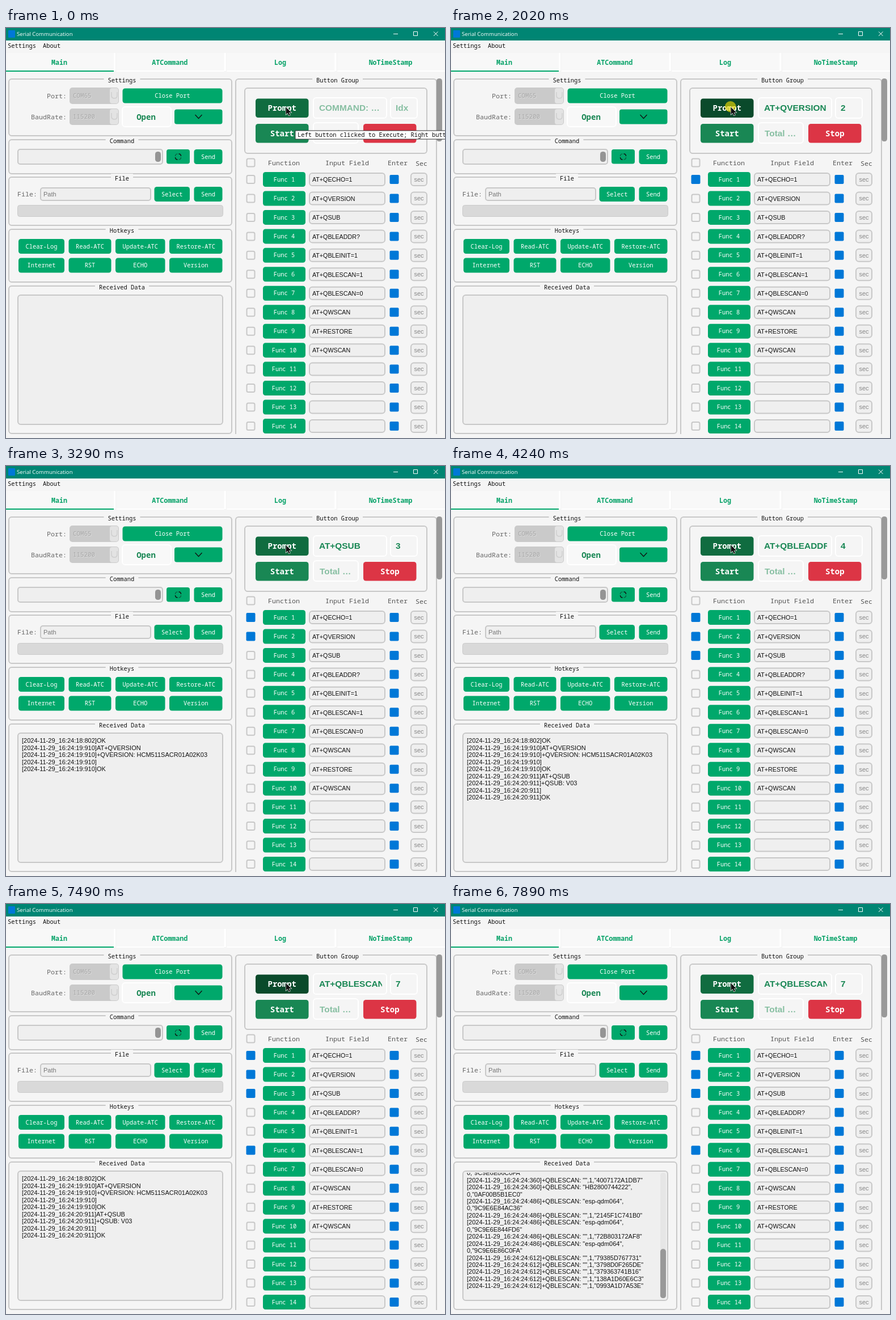
An HTML page for the animation above (8 s loop, 774 by 723 pixels).

```html
<!DOCTYPE html>
<html lang="en">
<head>
<meta charset="utf-8">
<title>Serial Communication</title>
<style>
html, body { margin: 0; width: 100%; height: 100%; overflow: hidden; background: #f5f5f5; }
svg { display: block; }
text { white-space: pre; }
.mono { font-family: "Noto Sans Mono", "DejaVu Sans Mono", monospace; }
.sans { font-family: "Liberation Sans", Arial, sans-serif; }
.ui { font-family: "Open Sans", "Noto Sans", sans-serif; }
.bold { font-weight: bold; }
</style>
</head>
<body>
<svg id="stage" width="774" height="723" viewBox="0 0 774 723" xmlns="http://www.w3.org/2000/svg">
  <defs>
    <clipPath id="logClip"><rect x="22" y="474" width="359" height="221"/></clipPath>
    <clipPath id="cmdClip"><rect x="550" y="126" width="113" height="30"/></clipPath>
    <clipPath id="listClip"><rect x="400" y="80" width="374" height="636"/></clipPath>
  </defs>
  <g id="base"></g>
  <g id="live"></g>
</svg>
<script>
const GREEN = '#00a86b', DARK = '#198754', BLUE = '#0078d7', EDGE = '#c8c8c8', BG = '#f5f5f5', FIELD = '#efefef';
const DURATION = 8000;

// Boxes are given by their outer edges; text by its vertical centre.
function box(x1, y1, x2, y2, fill, edge, r = 4, w = 2) {
  const i = edge ? w / 2 : 0;
  return `<rect x="${x1 + i}" y="${y1 + i}" width="${x2 - x1 - 2 * i}" height="${y2 - y1 - 2 * i}" rx="${r}" fill="${fill}"` +
    (edge ? ` stroke="${edge}" stroke-width="${w}"` : '') + '/>';
}
function text(s, x, y, size, fill, cls = 'mono', anchor = 'start') {
  return `<text x="${x}" y="${y + size * 0.35}" font-size="${size}" fill="${fill}" class="${cls}" text-anchor="${anchor}">${s}</text>`;
}
const mid = (s, x, y, size, fill, cls) => text(s, x, y, size, fill, cls, 'middle');
const path = (d, stroke, w = 1) => `<path d="${d}" fill="none" stroke="${stroke}" stroke-width="${w}"/>`;

function button(s, x1, y1, x2, y2, fill = GREEN, size = 10.4, cls = 'mono') {
  return box(x1, y1, x2, y2, fill, null, 4.5) + mid(s, (x1 + x2) / 2, (y1 + y2) / 2, size, '#fff', cls);
}
function group(title, x1, y1, x2, y2, cx) {
  const half = title.length * 3.12 + 7;
  return box(x1, y1, x2, y2, 'none', EDGE, 5) +
    box(cx - half, y1 - 5, cx + half, y1 + 7, BG, null, 0) +
    mid(title, cx, y1 + 3.2, 10.4, '#111');
}
function combo(s, y) {
  return box(112, y, 199, y + 29, '#cacaca', null, 5) +
    box(183, y + 1, 198, y + 28, '#e3e3e3', null, 4) +
    path(`M186 ${y + 8}v6q0 5 5 5t5-5v-6`, '#cfcfcf', 1.5) +
    text(s, 119, y + 15.5, 10.8, '#dedede') + text(s, 118, y + 14.5, 10.8, '#a8a8a8');
}
const tick = (x, y) => box(x - 8, y - 8, x + 8, y + 8, BLUE, null, 2);
const check = (y, on) => on ? tick(431.5, y) : box(423.5, y - 8, 439.5, y + 8, BG, EDGE, 2.5);

const commands = ['AT+QECHO=1', 'AT+QVERSION', 'AT+QSUB', 'AT+QBLEADDR?', 'AT+QBLEINIT=1', 'AT+QBLESCAN=1',
  'AT+QBLESCAN=0', 'AT+QWSCAN', 'AT+RESTORE', 'AT+QWSCAN', '', '', '', ''];
const rowY = i => 267 + i * 33.46;

function drawTop() {
  let s = box(0, 0, 774, 22, '#008573', null, 0) + box(4, 4, 16, 17, BLUE, null, 1) +
    text('Serial Communication', 19, 11, 9.6, '#fff', 'ui') +
    path('M683 10.5h8M718.5 6.5h7v7h-7zM754 6.5l7.500 7.500M761.500 6.500l-7.500 7.500', '#fff') +
    text('Settings', 3, 31, 10.4, '#111') + text('About', 65, 31, 10.4, '#111');
  ['Main', 'ATCommand', 'Log', 'NoTimeStamp'].forEach((name, i) => {
    const x = i * 194.7;
    s += box(x, 44, x + 190.5, 76, '#f8f8f8', null, 0) + box(x + 190, 44, x + 193, 76, '#fff', null, 0) +
      box(x, 75, x + 190, 77, i ? '#fff' : GREEN, null, 0) + mid(name, 94 + x, 61, 11.67, '#07a268', 'mono bold');
  });
  return s;
}

function drawLeft() {
  let s = group('Settings', 4, 89, 399, 191, 204.5) + group('Command', 4, 196, 399, 258, 204.5) +
    group('File', 4, 262, 399, 349, 204.5) + group('Hotkeys', 4, 354, 399, 449, 204.5) +
    group('Received Data', 4, 454, 399, 716, 204.5);
  s += text('Port:', 72, 120, 11.67, '#666') + text('BaudRate:', 44, 157, 11.67, '#666') +
    combo('COM65', 105) + combo('115200', 142) + button('Close Port', 205.5, 106.5, 381.5, 132.5) +
    box(204, 138, 292, 175, '#f8f8f8', '#fff', 5) + mid('Open', 247, 157, 14, DARK, 'mono bold') +
    box(297, 143.5, 381.5, 169.5, GREEN) + path('M333.5 153l6 6.5l6-6.5', '#111', 1.3);
  s += box(20, 213, 277, 241, FIELD, EDGE) + box(263, 218, 273, 236, '#949494', null, 4.5) +
    box(283, 214, 324, 239.5, GREEN) +
    path('M304.500 222q4 0 4 4M302.500 232q-4 0-4-4', '#111', 1.4) +
    path('M302.500 222q-4 0-4 4M304.500 232q4 0 4-4', '#0b5a3d', 1.2) +
    button('Send', 331.5, 214, 381.5, 240);
  s += text('File:', 20, 293, 11.67, '#666') + box(60, 281, 256, 305, FIELD, EDGE) +
    text('Path', 66, 293, 11, '#777', 'sans') + button('Select', 261.5, 280, 324, 306) +
    button('Send', 331.5, 280, 381.5, 306) + box(20, 312, 383, 333, '#d9d9d9', '#cbcbcb', 4, 1);
  const cols = [[22, 103], [110.5, 185.5], [193, 280.5], [288, 381.5]];
  ['Clear-Log', 'Read-ATC', 'Update-ATC', 'Restore-ATC', 'Internet', 'RST', 'ECHO', 'Version'].forEach((name, i) => {
    const [x1, x2] = cols[i % 4], y = i < 4 ? 372 : 405.5;
    s += button(name, x1, y, x2, y + 26);
  });
  return s + box(20, 470, 383, 700, FIELD, EDGE, 5);
}

function drawRight() {
  let s = '<g clip-path="url(#listClip)">' + group('Button Group', 404, 89, 760, 730, 584.5) + '</g>' +
    box(759, 89, 769, 200, '#999', null, 4.5) + box(420, 105, 743, 222, 'none', EDGE, 5) +
    box(541, 122, 672, 160, BG, '#fff', 5) + box(677, 122, 726, 160, BG, '#fff', 5) +
    box(541, 166, 622, 204, BG, '#fff', 5) + text('Total …', 553, 185.5, 15.4, '#87bfa2', 'sans bold') +
    button('Start', 440, 169, 533.5, 202.5, DARK, 14, 'mono bold') +
    button('Stop', 630, 169, 723.5, 202.5, '#dc3545', 14, 'mono bold') + check(237.5, false);
  [['Function', 462, 238], ['Input Field', 563, 238], ['Enter', 673, 238], ['Sec', 722, 239]]
    .forEach(([name, x, y]) => s += text(name, x, y, 11.67, '#555'));
  commands.forEach((cmd, i) => {
    const y = rowY(i);
    s += button('Func ' + (i + 1), 453, y - 13, 528, y + 13) + box(534, y - 12, 669, y + 12, FIELD, EDGE, 5) +
      text(cmd, 540, y + 0.5, 10.7, '#111', 'sans') + tick(684.5, y) +
      box(713, y - 12, 743, y + 12, FIELD, EDGE, 5) + mid('sec', 728, y, 11, '#888', 'sans');
  });
  return s;
}

// Log lines: time stamp plus message; scan results are "address" or "name/address".
const stamp = (t, s) => `[2024-11-29_16:24:${t}]${s}`;
const scan = (t, list) => list.split(' ').flatMap(item => {
  const [addr, name] = item.split('/').reverse();
  return name ? [stamp(t, `+QBLESCAN: "${name}",`), `0,"${addr}"`] : [stamp(t, `+QBLESCAN: "",1,"${addr}"`)];
});
const ESP = 'esp-qdm064/9C9E6E8';
const log = [
  stamp('18:802', 'OK'),
  ...['AT+QVERSION', '+QVERSION: HCM511SACR01A02K03', '', 'OK'].map(s => stamp('19:910', s)),
  ...['AT+QSUB', '+QSUB: V03', '', 'OK'].map(s => stamp('20:911', s)),
  ...['AT+QBLESCAN=1', '', 'OK'].map(s => stamp('24:095', s)),
  ...scan('24:221', `25C05D879269 EDFE0EDBFE0D ${ESP}4D532 3798D0F265DE 379363741B16 ${ESP}4AC36`),
  ...scan('24:360', `D19574B563D9 78BC7DAAA4FB 78BC7DAAA4FB F225BD66C4A6 25C05D879269 ${ESP}6C0FA 4007172A1DB7 HB2800744222/0AF00B5B1EC0`),
  ...scan('24:486', `${ESP}4AC36 2145F1C741B0 ${ESP}44FD6 72B803172AF8 ${ESP}6C0FA`),
  ...scan('24:612', '79385D767731 3798D0F265DE 379363741B16 138A1D60E6C3 0993A1D7A53E')
];

function drawLog(count) {
  const pitch = 12.45, full = count > 16;
  const first = full ? 673.5 - (count - 1) * pitch : 484.5;
  let s = '<g clip-path="url(#logClip)">';
  for (let i = full ? count - 17 : 0; i < count; i++) s += text(log[i], 28, first + i * pitch, 11, '#111', 'sans');
  s += '</g>';
  if (full) s += box(369, 474, 379, 695, '#e6e6e6', null, 4.5) +
    box(369, 695 - 3865 / (count + 1.6), 379, 695, '#999', null, 4.5);
  return s;
}

// time, next command, button held, click mark, executed rows, log lines
const steps = [
  [0, 0, 0, '', [], 0],
  [500, 1, 1, 'left', [], 0],
  [630, 1, 0, '', [], 0],
  [2020, 2, 1, 'left', [1], 0],
  [2090, 2, 1, '', [1], 0],
  [2160, 2, 0, '', [1], 1],
  [3150, 3, 1, 'left', [1, 2], 1],
  [3220, 3, 1, '', [1, 2], 1],
  [3290, 3, 0, '', [1, 2], 5],
  [4090, 4, 1, 'left', [1, 2, 3], 5],
  [4240, 4, 0, '', [1, 2, 3], 9],
  [5630, 5, 0, 'right', [1, 2, 3], 9],
  [5830, 5, 0, '', [1, 2, 3], 9],
  [6690, 6, 0, 'right', [1, 2, 3], 9],
  [6820, 6, 0, '', [1, 2, 3], 9],
  [7420, 7, 1, 'left', [1, 2, 3, 6], 9],
  [7490, 7, 1, '', [1, 2, 3, 6], 9],
  [7560, 7, 0, '', [1, 2, 3, 6], 20],
  [7690, 7, 0, '', [1, 2, 3, 6], 30],
  [7760, 7, 0, '', [1, 2, 3, 6], 38],
  [7890, 7, 0, '', [1, 2, 3, 6], 43]
];

function drawLive([, next, held, mark, done, lines]) {
  const ink = next ? DARK : '#87bfa2';
  let s = button('Prompt', 440, 124.5, 533.5, 158, held ? '#0a4a2b' : '#106c40', 14, 'mono bold') +
    '<g clip-path="url(#cmdClip)">' +
    text(next ? commands[next - 1] : 'COMMAND: …', 552, 141, 15.4, ink, 'sans bold') + '</g>' +
    text(next || 'Idx', 687, 141, 15.4, ink, 'sans bold');
  commands.forEach((_, i) => s += check(rowY(i), done.includes(i + 1)));
  s += drawLog(lines);
  if (!next) s += box(509.5, 180.5, 790, 196.5, '#fff', '#333', 0, 1) +
    text('Left button clicked to Execute; Right button', 514, 188.5, 10.4, '#111');
  if (mark) s += `<circle cx="492.7" cy="138.7" r="9.7" fill="${mark === 'left' ? '#ffe600' : '#f00'}" opacity=".6"/>`;
  return s + '<path d="M493.5 139.5v13l3-2.8 2.200 4.800 2.200-1-2.100-4.600h4.200z" fill="#111" stroke="#fff" stroke-width="1.2" paint-order="stroke"/>';
}

const live = document.getElementById('live');
document.getElementById('base').innerHTML = drawTop() + drawLeft() + drawRight();
const start = performance.now();
let shown;
function frame() {
  const t = (performance.now() - start) % DURATION;
  const step = steps.findLast(([at]) => at <= t);
  if (step !== shown) live.innerHTML = drawLive(shown = step);
  requestAnimationFrame(frame);
}
frame();
</script>
</body>
</html>
```
